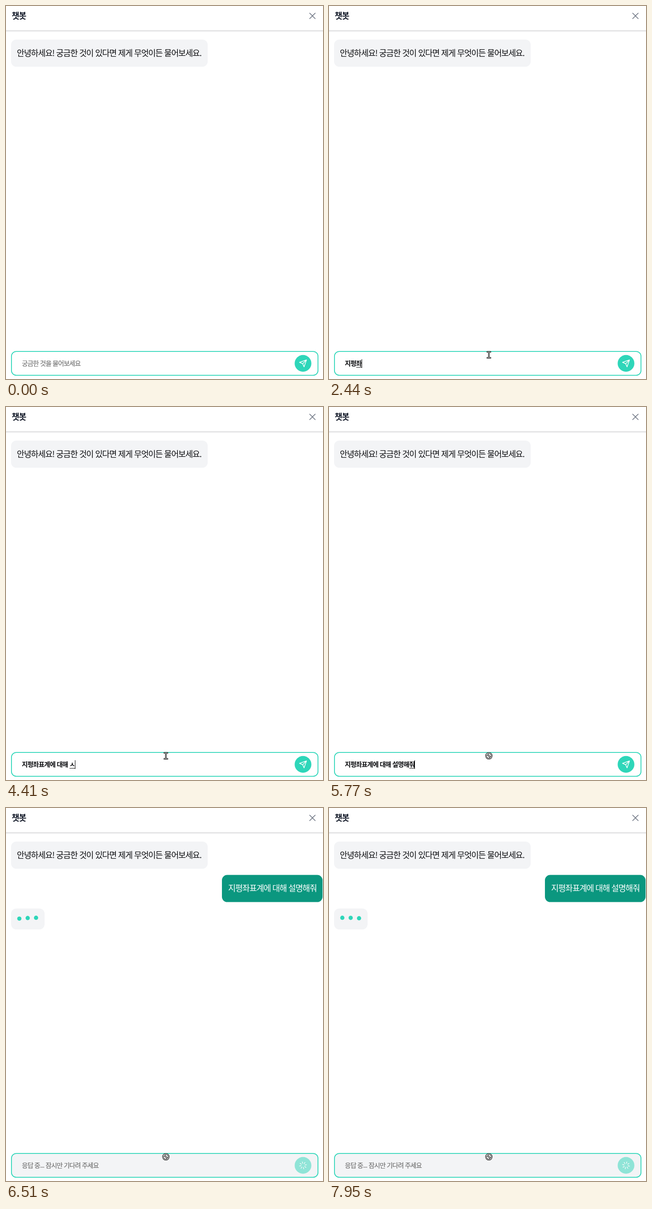
An HTML page for the animation above (8000 ms loop, 690 by 811 pixels).

```html
<!DOCTYPE html>
<html lang="ko">
<head>
<meta charset="utf-8">
<title>챗봇</title>
<style>
  html, body { margin: 0; width: 100%; height: 100%; overflow: hidden; background: #fff; }
  svg { display: block; width: 690px; height: 811px; }
  text {
    font: 400 18px "Noto Sans CJK KR", "Noto Sans CJK", "Noto Sans CJK JP", sans-serif;
    letter-spacing: -.064em;
    white-space: pre;
    fill: #0c0d10;
  }
  .title { font-weight: 600; fill: #111827; }
  .input { font-size: 14.2px; font-weight: 600; }
  .hint { font-size: 14.2px; fill: #757575; stroke: #757575; stroke-width: .25px; }
  .line { fill: none; stroke-linecap: round; stroke-linejoin: round; }
</style>
</head>
<body>
<svg viewBox="0 0 690 811" xmlns="http://www.w3.org/2000/svg">
  <defs>
    <linearGradient id="shade" x1="0" y1="0" x2="0" y2="1">
      <stop offset="0" stop-color="#e8e8ea"/>
      <stop offset="1" stop-color="#fff"/>
    </linearGradient>
    <path id="beamShape" d="M-3.5-6.5H-1Q0-6.5 0-5.5Q0-6.5 1-6.5H3.5M0-5.5V5.5M-3.5 6.5H-1Q0 6.5 0 5.5Q0 6.5 1 6.5H3.5"/>
    <path id="blockedShape" d="M-6.2 0A6.2 6.2 0 1 1 6.2 0A6.2 6.2 0 1 1-6.2 0M-4.4-4.4L4.4 4.4"/>
  </defs>
  <rect width="690" height="811" fill="#fff"/>

  <text class="title" x="12.5" y="27.5">챗봇</text>
  <path class="line" d="M661 15.5l12 12m0-12l-12 12" stroke="#6b7280" stroke-width="1.6"/>
  <rect y="52.6" width="690" height="2" fill="#dedee0"/>
  <rect y="54.6" width="690" height="2.4" fill="url(#shade)"/>

  <rect x="11" y="73" width="428" height="59" rx="11.5" fill="#f3f4f6"/>
  <text x="23.5" y="108.5">안녕하세요! 궁금한 것이 있다면 제게 무엇이든 물어보세요.</text>

  <g id="reply">
    <rect x="470" y="145.6" width="219" height="59" rx="11.5" fill="#0b977f"/>
    <text x="483.5" y="181" style="fill:#fff">지평좌표계에 대해 설명해줘</text>
    <rect x="11" y="218.4" width="73" height="45.6" rx="11.5" fill="#f3f4f6"/>
    <g id="dots" fill="#2ed6b9">
      <circle cx="29" r="4.6"/><circle cx="47.2" r="4.6"/><circle cx="65.4" r="4.6"/>
    </g>
  </g>

  <rect id="field" x="11.9" y="751.1" width="667.2" height="51.8" rx="10.5" stroke="#2ed6b9" stroke-width="1.8"/>
  <text id="hint" class="hint" x="34.5" y="782.3"></text>
  <text id="typed" class="input" x="34.5" y="782.3"></text>
  <rect id="underline" y="785" height="1" fill="#111"/>
  <rect id="caret" y="768" width="1" height="19" fill="#000"/>

  <g id="button" transform="translate(646.5 777)">
    <circle r="18.2" fill="#2ed6b9"/>
    <g class="line" stroke="#fff" stroke-width="1.9">
      <path id="send" transform="scale(.76) translate(-12 -12)" d="M22 2l-7 20-4-9-9-4ZM22 2L11 13"/>
      <g id="spinner"></g>
    </g>
  </g>

  <g id="beam" class="line">
    <use href="#beamShape" stroke="#000" stroke-width="3"/>
    <use href="#beamShape" stroke="#fff" stroke-width=".9"/>
  </g>
  <g id="blocked" class="line" transform="translate(348 758.5)">
    <circle r="6" fill="#fff"/>
    <use href="#blockedShape" stroke="#000" stroke-width="3.2"/>
    <use href="#blockedShape" stroke="#fff" stroke-width="1.2"/>
  </g>
</svg>
<script>
const LOOP = 8000, FOCUS = 900, BLOCK = 5770, SEND = 5790;
const LEFT = 34.5;

// Each keystroke: time, finished text, syllable being composed.
const keys = [
  [1300, '', 'ㅈ'], [1640, '', '지'], [1760, '', '짚'], [1880, '지', '펴'], [2030, '지', '평'],
  [2290, '지평', 'ㅈ'], [2370, '지평', '조'], [2440, '지평', '좌'],
  [2590, '지평', '좦'], [2690, '지평좌', '표'], [2890, '지평좌', '푝'], [3250, '지평좌표', '계'],
  [3410, '지평좌표', '곙'], [3490, '지평좌표계', '에'],
  [3890, '지평좌표계에 ', ''], [3970, '지평좌표계에 ', 'ㄷ'], [4050, '지평좌표계에 ', '대'],
  [4130, '지평좌표계에 ', '댛'], [4210, '지평좌표계에 대', '해'],
  [4330, '지평좌표계에 대해 ', ''], [4410, '지평좌표계에 대해 ', 'ㅅ'],
  [4520, '지평좌표계에 대해 ', '서'], [4620, '지평좌표계에 대해 ', '설'],
  [4770, '지평좌표계에 대해 ', '섦'], [4850, '지평좌표계에 대해 설', '며'],
  [4950, '지평좌표계에 대해 설', '명'], [5050, '지평좌표계에 대해 설명', 'ㅎ'],
  [5130, '지평좌표계에 대해 설명', '해'], [5270, '지평좌표계에 대해 설명', '핮'],
  [5320, '지평좌표계에 대해 설명해', '주'], [5500, '지평좌표계에 대해 설명해', '줘']
];

// Pointer stops: time, x, y.
const pointer = [
  [90, 367, 778], [110, 364, 778], [130, 362, 777.5], [290, 361, 777.5], [470, 357, 777],
  [490, 352, 776], [530, 355, 776.5], [550, 360, 777], [750, 358, 774], [800, 355, 769],
  [850, 352, 764], [900, 350, 761], [950, 349, 759], [990, 348, 758.5]
];

const $ = id => document.getElementById(id);
const set = (el, attrs) => { for (const k in attrs) el.setAttribute(k, attrs[k]); };
const show = (id, on) => set($(id), { visibility: on ? 'visible' : 'hidden' });
const latest = (list, t) => list.filter(item => item[0] <= t).pop();

for (let i = 0; i < 8; i++) {
  const ray = document.createElementNS('http://www.w3.org/2000/svg', 'path');
  set(ray, { d: 'M0-7.7V-4.4', transform: `rotate(${i * 45})`, 'stroke-width': 1.4 });
  $('spinner').append(ray);
}

function bezier(x1, y1, x2, y2) {
  const at = (a, b, s) => 3 * a * s * (1 - s) ** 2 + 3 * b * s * s * (1 - s) + s ** 3;
  return x => {
    let lo = 0, hi = 1;
    for (let i = 0; i < 24; i++) {
      const mid = (lo + hi) / 2;
      if (at(x1, x2, mid) < x) lo = mid; else hi = mid;
    }
    return at(y1, y2, lo);
  };
}
const fall = bezier(.8, 0, 1, 1), rise = bezier(0, 0, .2, 1);

// Fraction of the full bounce height, 1 at the top.
function bounce(phase) {
  const p = phase - Math.floor(phase);
  return p < .5 ? 1 - fall(p * 2) : rise(p * 2 - 1);
}

function measure(text) {
  $('typed').textContent = text;
  return text ? $('typed').getComputedTextLength() : 0;
}

function drawInput(t, busy) {
  const [, done, part] = !busy && latest(keys, t) || [0, '', ''];
  const start = LEFT + measure(done);
  const end = LEFT + measure(done + part);
  set($('underline'), { x: start + .5, width: Math.max(0, end - start) });
  set($('caret'), { x: Math.round(end) });
  show('underline', part !== '');
  show('caret', !busy && t >= FOCUS);
  $('hint').textContent = busy ? '응답 중... 잠시만 기다려 주세요'
    : t < keys[0][0] ? '궁금한 것을 물어보세요' : '';
}

function render(t) {
  const busy = t >= SEND;
  drawInput(t, busy);
  set($('field'), { fill: busy ? '#f3f4f6' : '#fff' });
  set($('button'), { opacity: busy ? .5 : 1 });
  show('reply', busy);
  // Children of a hidden group inherit its visibility, so the icons toggle alone.
  show('send', !busy);
  show('spinner', busy);
  set($('spinner'), { transform: `rotate(${(t - SEND) * .36})` });
  [...$('dots').children].forEach((dot, i) =>
    set(dot, { cy: 241 - 2.3 * bounce((t - 5980) / 1000 + i * .2) }));

  const spot = latest(pointer, t);
  show('beam', spot && t < BLOCK);
  show('blocked', t >= BLOCK);
  if (spot) set($('beam'), { transform: `translate(${spot[1]} ${spot[2]})` });
}

const begin = performance.now();
function tick() {
  render((performance.now() - begin) % LOOP);
  requestAnimationFrame(tick);
}
tick();
</script>
</body>
</html>
```
